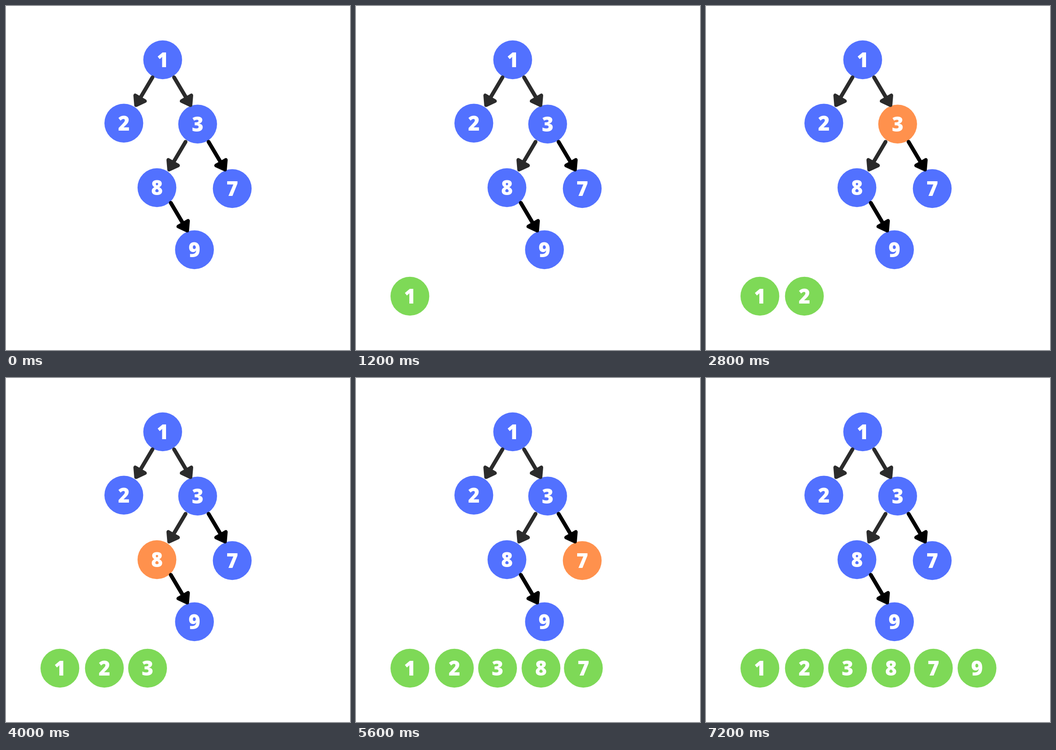
These frames come from a looping animation (748 by 748 pixels, 7600 ms). An HTML page with a canvas:

```html
<!DOCTYPE html>
<html lang="en">
<head>
<meta charset="utf-8">
<title>Tree traversal</title>
<style>
  html, body { margin: 0; width: 100%; height: 100%; overflow: hidden; background: #fff; }
  canvas { display: block; width: 100vw; height: 100vh; }
</style>
</head>
<body>
<canvas id="stage"></canvas>
<script>
const SIZE = 748, STEP = 400, STEPS = 19;
const BLUE = '#5271ff', ORANGE = '#ff914d', GREEN = '#7ed957';
const DARK = '#2b2b2b', BLACK = '#000';
const RADIUS = 42.2, ROW_Y = 631;

// In visiting order; slot is the x position in the result row.
const nodes = [
  { label: '1', x: 340.7, y: 117, slot: 117.2 },
  { label: '2', x: 256.2, y: 254.7, slot: 213.9 },
  { label: '3', x: 416.7, y: 256.8, slot: 307.8 },
  { label: '8', x: 328.2, y: 395, slot: 402.3 },
  { label: '7', x: 491.9, y: 397, slot: 494.4 },
  { label: '9', x: 409.8, y: 530, slot: 589.3 }
];

// Start point, side (-1 left, 1 right) and colour.
const arrows = [
  [318.5, 155.2, -1, DARK],
  [365.5, 155.2, 1, DARK],
  [390.4, 295.4, -1, DARK],
  [440.5, 295.4, 1, BLACK],
  [358.3, 428, 1, BLACK]
];

const canvas = document.getElementById('stage');
const ctx = canvas.getContext('2d');
const ratio = window.devicePixelRatio || 1;
canvas.width = canvas.height = Math.round(SIZE * ratio);
ctx.scale(canvas.width / SIZE, canvas.height / SIZE);

function disc(x, y, label, color) {
  ctx.fillStyle = color;
  ctx.beginPath();
  ctx.arc(x, y, RADIUS, 0, Math.PI * 2);
  ctx.fill();
  ctx.fillStyle = '#fff';
  ctx.fillText(label, x, y + 16.2);
}

function arrow(x, y, side, color) {
  ctx.save();
  ctx.translate(x, y);
  ctx.scale(side, 1);
  ctx.strokeStyle = ctx.fillStyle = color;
  ctx.lineCap = ctx.lineJoin = 'round';
  ctx.lineWidth = 8.4;
  ctx.beginPath();
  ctx.moveTo(0, 0);
  ctx.lineTo(27, 45.5);
  ctx.stroke();
  ctx.lineWidth = 8;
  ctx.beginPath();
  ctx.moveTo(16.5, 51.4);
  ctx.lineTo(37.5, 39.3);
  ctx.lineTo(35.7, 60.3);
  ctx.closePath();
  ctx.fill();
  ctx.stroke();
  ctx.restore();
}

function draw(now) {
  const step = Math.floor(now / STEP) % STEPS;
  ctx.fillStyle = '#fff';
  ctx.fillRect(0, 0, SIZE, SIZE);
  ctx.font = '800 43.5px "Open Sans", sans-serif';
  ctx.textAlign = 'center';
  ctx.textBaseline = 'alphabetic';

  // Each visit: highlight, add to the row, clear the highlight.
  nodes.forEach((n, i) => {
    const phase = step - 3 * i;
    disc(n.x, n.y, n.label, phase === 1 || phase === 2 ? ORANGE : BLUE);
    if (phase >= 2) disc(n.slot, ROW_Y, n.label, GREEN);
  });
  arrows.forEach(a => arrow(...a));
}

const start = performance.now();
function tick() {
  draw(performance.now() - start);
  requestAnimationFrame(tick);
}
tick();
</script>
</body>
</html>
```
